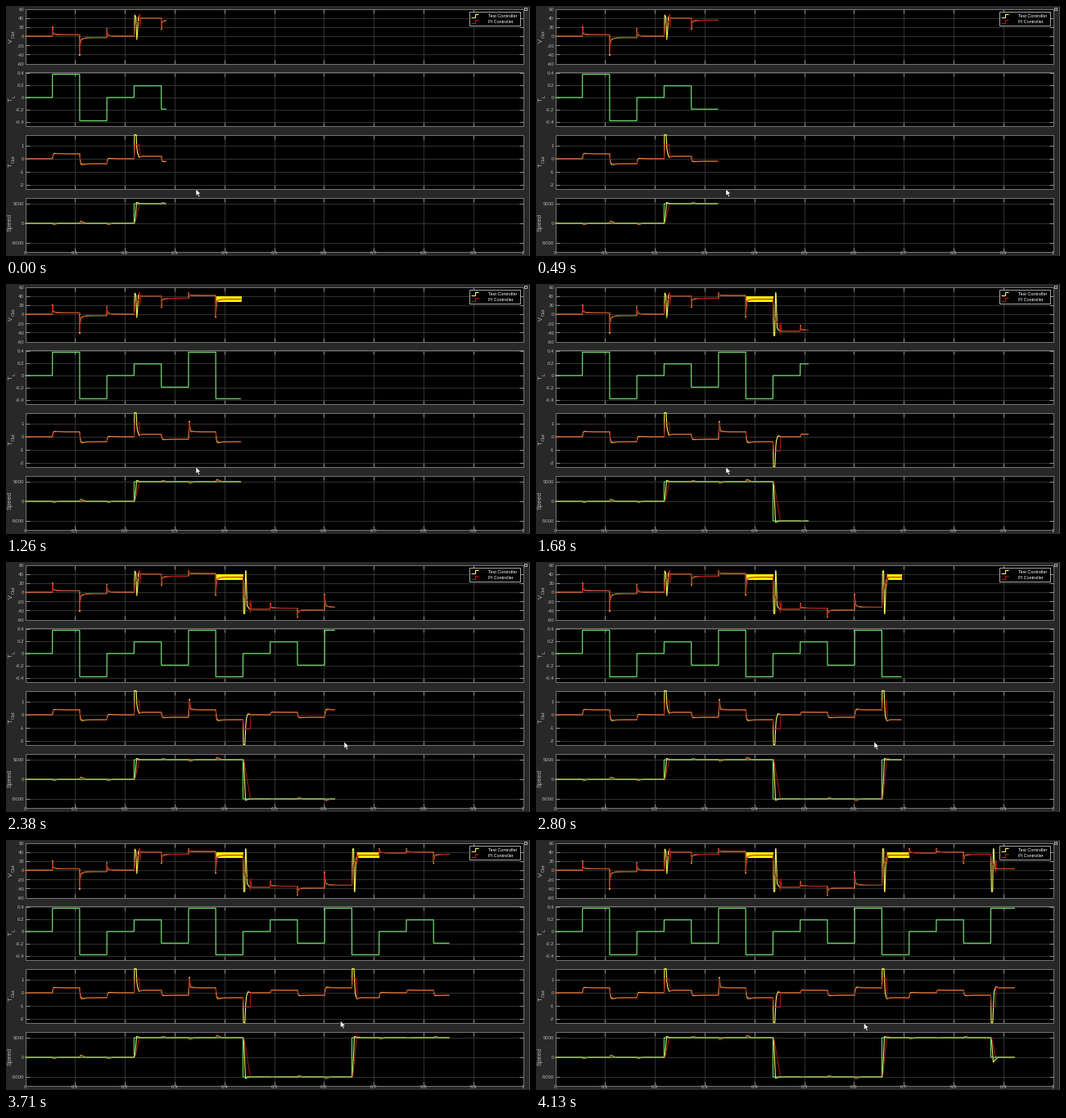
Write a matplotlib script that moves like this. It is 640 by 306 pixels and loops after 4200 ms.

```python
import numpy as np
import matplotlib.pyplot as plt
from matplotlib.animation import FuncAnimation
from matplotlib.patches import Polygon, Rectangle

W, H, DPI = 640, 306, 100
FRAMES, STEP_MS = 60, 70
PX = 72 / DPI
LEFT, RIGHT = 23.5, 631.5
PERIOD = 33.25
YELLOW, RED, GREEN = "#f7f25a", "#b01818", "#72e070"

LOAD = np.array([0, .38, -.38, 0, .19, -.19, .38, -.38, 0,
                 .19, -.19, .38, -.38, 0, .19, -.19, .38])
VOLT = np.array([0, 3, -3, 0, 40, 35, 41, 33, -37,
                 -35, -39, -33, 33, 38, 40, 35, 3.])
SPEED = np.repeat([0, 5000, -5000, 5000, 0], [4, 4, 4, 4, 1]).astype(float)
PEAK = {1: 20, 2: -40, 3: 16, 5: 16, 6: 47, 7: -5, 9: -24,
        10: -55, 11: -5, 13: 47, 14: 47, 15: 16}
RAMP = {4: 6.5, 8: 9, 12: 6, 16: 6}    # reversals and their slow settling widths

plt.rcParams["font.family"] = "Liberation Sans"
fig = plt.figure(figsize=(W / DPI, H / DPI), dpi=DPI, facecolor="#282828")
ax = fig.add_axes([0, 0, 1, 1])
ax.set(xlim=(0, W), ylim=(H, 0))
ax.axis("off")


def text(x, y, s, size, color="#b4b4b4", **kw):
    kw = {"ha": "center", "va": "center_baseline", **kw}
    ax.text(x, y, s, fontsize=size * PX, color=color, **kw)


def line(xs, ys, color, width=1.0, z=3):
    return ax.plot(xs, ys, color=color, lw=width * PX, zorder=z,
                   solid_joinstyle="miter", solid_capstyle="butt")[0]


class Panel:
    def __init__(self, top, bottom, zero, unit, ticks):
        self.top, self.bottom, self.zero, self.unit = top, bottom, zero, unit
        ax.add_patch(Rectangle((LEFT, top), RIGHT - LEFT, bottom - top,
                               fc="black", ec="#8c8c8c", lw=.8 * PX, zorder=1))
        for i in range(1, 10):
            x = LEFT + 60.8 * i
            line([x, x], [top, bottom], "#3d3d3d", .8, 2)
            for a, b in ((top, top + 5), (bottom - 5, bottom)):
                line([x, x], [a, b], "#a8a8a8", .8, 2)
        for v in ticks:
            y = self.y(v)
            if top + 1 < y < bottom - 1:
                line([LEFT, RIGHT], [y, y], "#3d3d3d", .8, 2)
                for a, b in ((LEFT, LEFT + 5), (RIGHT - 5, RIGHT)):
                    line([a, b], [y, y], "#a8a8a8", .8, 2)
            text(22, y + .4, f"{v:g}", 6, ha="right")

    def y(self, v):
        return np.clip(self.zero - np.asarray(v) * self.unit,
                       self.top, self.bottom)


volt = Panel(3.5, 70.5, 37, .5583, range(-60, 61, 20))
load = Panel(80.5, 146.5, 112, 75, [-.4, -.2, 0, .2, .4])
torque = Panel(157.5, 223.5, 187, 16, [-2, -1, 0, 1])
speed = Panel(234.5, 301, 266, .0048, [-5000, 0, 5000])

for i in range(11):
    text(LEFT + 60.8 * i, 302.5, f"{i / 10:g}", 6.2)
for main, sub, y, sy in (("V", "Out", 42, 34), ("T", "L", 114.5, 110.5),
                         ("T", "Out", 195, 187)):
    text(6.5, y, main, 7.6, rotation=90, va="center")
    text(9.5, sy, sub, 6, rotation=90, va="center")
text(5.5, 265, "Speed", 7.6, rotation=90, va="center")

# legend and window corner
ax.add_patch(Rectangle((565.5, 6.5), 62, 17, fc="black", ec="#d0d0d0",
                       lw=.8 * PX, zorder=8))
for y, name, color in ((12, "Test Controller", YELLOW),
                       (19, "PI Controller", RED)):
    line([568, 572.5, 572.5, 577], [y + 2, y + 2, y - 2, y - 2], color, 1.1, 9)
    text(589, y + .2, name, 5.5, "white", ha="left", zorder=9)
line([638.5, 638.5], [0, H], "#555555", 1, 1)
ax.add_patch(Rectangle((632.5, 1.5), 3.5, 3, fc="#303030", ec="#c8c8c8",
                       lw=.8 * PX, zorder=8))


def reversal(k, s, p, l):
    """Curves (volt, torque, speed) x (test, PI) while the speed changes."""
    d = np.sign(SPEED[k] - SPEED[k - 1])
    w = RAMP[k]
    if k == 4:
        v1 = np.interp(s, [0, .7, 2.2, 3.2, 4.2, 5.2, 7],
                       [p, 47, 42, -9, 10, 43, l])
    else:
        v1 = np.interp(s, [0, .8, 2.2, 3, 3.6, 5, 8],
                       [p, 47 * d, 47 * d, -47 * d, -47 * d, .8 * l, l])
    near = p + (l - p) * .55
    v2 = np.interp(s, [0, .6, w - .6, w, w + .5, w + 1.5],
                   [p, near, p + (l - p) * .85, l + 8 * d, l - 20 * d, l])
    t0, t1 = LOAD[k - 1], LOAD[k]
    q1 = np.interp(s, [0, .5, 2.2, 3.2, 4, 6, 10],
                   [t0, 2.5 * d, 2.5 * d, .9 * d, t1 + .3 * d, t1 - .08 * d, t1])
    q2 = np.interp(s, [0, .6, w - .3, w + .3, w + 2],
                   [t0, 1.1 * d, 1.1 * d, t1 - .05 * d, t1])
    n0, n1 = SPEED[k - 1], SPEED[k]
    over = (1300 if k == 16 else 350) * d
    n1st = np.interp(s, [0, .8, 3, 5, 9], [n0, n0, n1 + over, n1 + over / 2, n1])
    n2nd = np.interp(s, [0, 1, w, w + 6, w + 12],
                     [n0, n0, n1 + 450 * d * (k == 12), n1, n1])
    return (v1, v2), (q1, q2), (n1st, n2nd)


def load_change(k, s, p, l):
    peak = PEAK.get(k, l)
    v2 = l + (peak - l) * (.86 * np.exp(-s / .5) + .14 * np.exp(-s / 3.5))
    v1 = v2 + .06 * (peak - l) * np.exp(-s / 4)
    t0, t1 = LOAD[max(k - 1, 0)], LOAD[k]
    q2 = t1 + (t0 - t1) * np.exp(-s / .8)
    if k == 6:
        q2 = q2 + .9 * np.exp(-((s - 1) / .7) ** 2)
    q1 = q2 + .24 * (t1 - t0) * (1 - np.exp(-s)) * np.exp(-s / 4)
    bump = -700 * (t1 - t0) * (s / 1.6) * np.exp(1 - s / 1.6)
    return (v1, v2), (q1, q2), (SPEED[k] + bump, SPEED[k] + bump * .8)


x = np.arange(LEFT, 586, .125)
seg = ((x - LEFT) / PERIOD).astype(int)
curves = np.zeros((3, 2, x.size))
for k in range(len(LOAD)):
    m = seg == k
    s = x[m] - LEFT - k * PERIOD
    shape = reversal if k in RAMP else load_change
    for i, pair in enumerate(shape(k, s, VOLT[max(k - 1, 0)], VOLT[k])):
        curves[i, 0, m], curves[i, 1, m] = pair

# rapid switching of the test controller
chatter = ((x > 258) & (x < 289.4)) | ((x > 430) & (x < 455.6))
zigzag = np.where(np.arange(x.size) % 2, 1, -1)
curves[0, 0, chatter] = (33.3 + 6 * zigzag)[chatter]

traces = []


def trace(panel, values, color, width, z):
    traces.append((line([], [], color, width, z), panel.y(values)))


for panel, (test, pi) in zip((volt, torque, speed), curves):
    trace(panel, test, YELLOW, 1.1, 4)
    trace(panel, pi, RED, 1, 5)
trace(volt, np.where(chatter, curves[0, 0], np.nan), "#fff000", 1, 4.5)
trace(load, LOAD[seg], GREEN, 1.2, 6)
trace(speed, SPEED[seg], GREEN, 1.1, 6)

ARROW = np.array([(0, 0), (0, 8.2), (1.9, 6.5), (3.2, 9.6),
                  (4.6, 9), (3.3, 6), (5.8, 5.8)])
cursor = ax.add_patch(Polygon(ARROW, closed=True, fc="white", ec="#202020",
                              lw=.5 * PX, zorder=10))


def glide(f, start, end):
    u = np.clip((f - start) / (end - start), 0, 1)
    return u * u * (3 - 2 * u)


def update(f):
    head = np.interp(f, [0, 7, 18, 24, 34, 46, 59],
                     [196, 222.5, 287, 333, 402, 491, 585])
    n = np.searchsorted(x, head)
    for ln, y in traces:
        ln.set_data(x[:n], y[:n])
    a, b = glide(f, 27, 32), glide(f, 51, 56)
    cursor.set_xy(ARROW + (232 + 181 * a - 12.5 * b, 224 - 4 * a + 4 * b))
    return [ln for ln, _ in traces] + [cursor]


anim = FuncAnimation(fig, update, frames=FRAMES, interval=STEP_MS,
                     repeat=True, repeat_delay=0, blit=False)
plt.show()
```
